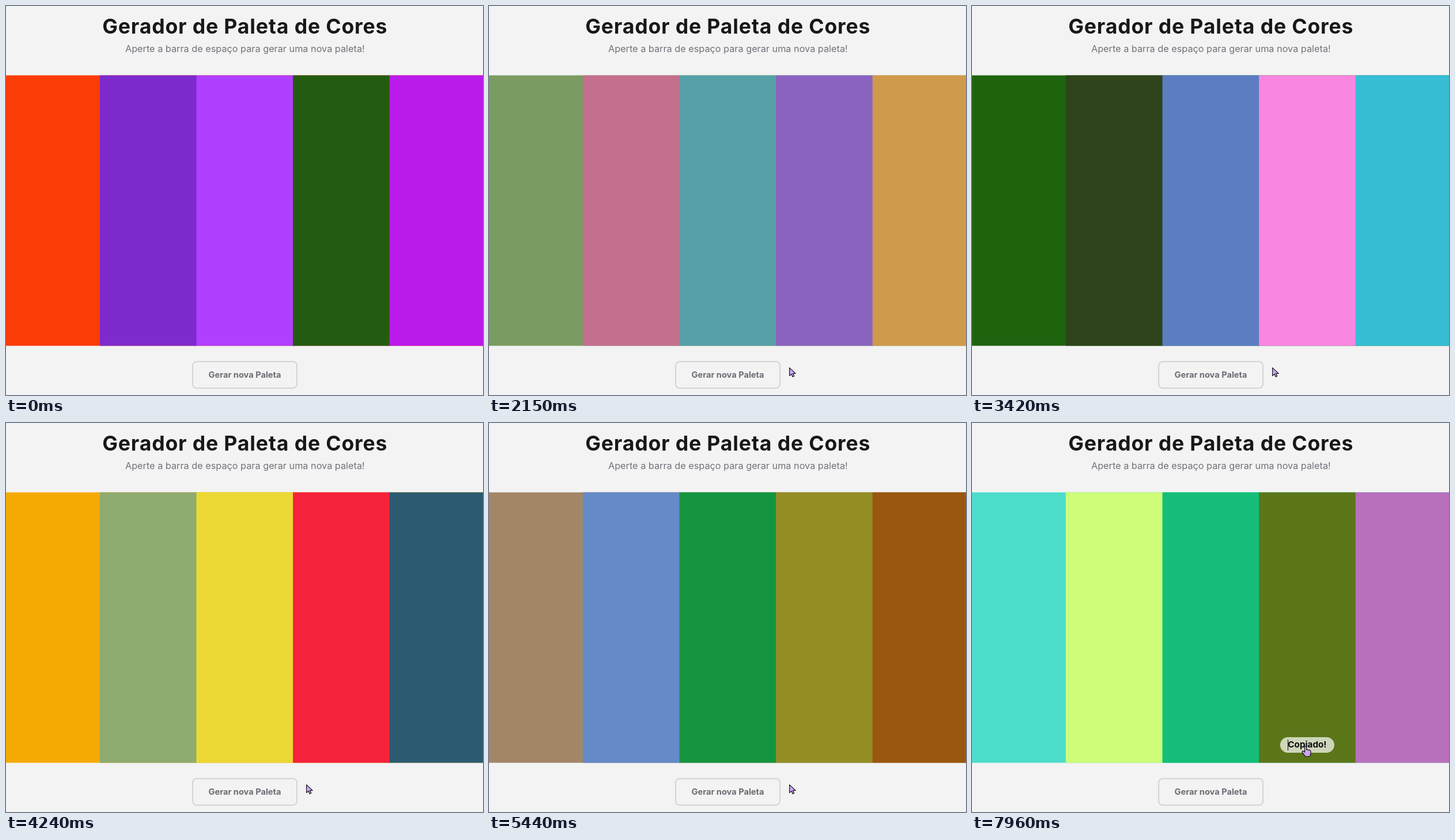
An HTML page with a canvas that plays this animation: 828 px wide and 676 px high, repeating every 8000 ms.

```html
<!DOCTYPE html>
<html lang="pt-BR">
<head>
<meta charset="utf-8">
<title>Gerador de Paleta de Cores</title>
<style>
  html, body { margin: 0; width: 100%; height: 100%; overflow: hidden; background: #f3f3f3; }
  canvas { display: block; width: 828px; height: 676px; }
</style>
</head>
<body>
<canvas id="stage" width="828" height="676"></canvas>
<script>
const ctx = document.getElementById('stage').getContext('2d');
const LOOP = 8000;
const STEP = 1000 / 15; // pointer sampling interval
const EDGES = [0, 162.8, 330.5, 498.1, 665.7, 828];
const TOP = 120.5, BOTTOM = 590.5;
const FAMILY = 'Inter, "Open Sans", sans-serif';

// Start time followed by the five colours shown from then on
const PALETTES = [
  [0, '#fb3c07', '#7d2bcd', '#b13fff', '#235c10', '#ba1beb'],
  [1490, '#93cbff', '#af74b7', '#757e0b', '#a1f04d', '#5fbf80'],
  [2150, '#7a9c62', '#c46f8e', '#58a0a8', '#8a63c0', '#d09a4c'],
  [2620, '#fcf4a4', '#e1fa92', '#e39254', '#43d098', '#ba1b9b'],
  [3020, '#8c7a4e', '#5f9f87', '#a66bb4', '#c9a65a', '#5d78a8'],
  [3420, '#1e640f', '#2f441a', '#5c7dc2', '#f986e0', '#37bdd6'],
  [3840, '#94785f', '#6b8f9c', '#b08a52', '#9a6fa6', '#5e9a74'],
  [4240, '#f5aa04', '#8fab70', '#ecd834', '#f5223b', '#2b5a71'],
  [4710, '#a5706a', '#7a86b0', '#68a07c', '#b9944f', '#805f92'],
  [5040, '#7e9a54', '#a8739a', '#5c8fa4', '#b5805c', '#6f72a9'],
  [5440, '#a38668', '#648ac7', '#15943f', '#948c24', '#9a5710'],
  [5840, '#4cddcb', '#cdfd79', '#15be78', '#5b7619', '#b870bc']
];

// Times at which the button caret switches, starting hidden
const BLINKS = [410, 940, 1490, 2020, 2550, 3090, 3620, 4110, 4710, 5170, 5710, 6240];

// Pointer path: time, x, y
const PATH = [
  [70, 633, 646], [140, 597, 641], [210, 558, 634], [280, 524, 621], [340, 505, 620],
  [410, 508, 624], [490, 521, 628], [6450, 521, 628], [6580, 560, 617],
  [6720, 640, 590], [6860, 718, 568], [6990, 742, 559], [7330, 742, 559],
  [7470, 698, 563], [7600, 610, 563], [7740, 579, 561], [8000, 579, 561]
];

// Clicks on a colour label: time and column
const CLICKS = [[7190, 4], [7860, 3]];

function paletteAt(t) {
  return PALETTES.filter(p => p[0] <= t).pop().slice(1);
}

function pointerAt(t) {
  if (t < PATH[0][0]) return null;
  const i = PATH.findIndex(p => p[0] > t);
  const [t0, x0, y0] = PATH[i - 1];
  const [t1, x1, y1] = PATH[i];
  const k = (t - t0) / (t1 - t0);
  return { x: x0 + (x1 - x0) * k, y: y0 + (y1 - y0) * k };
}

function text(str, x, y, weight, size, color, spacing = 0) {
  ctx.font = `${weight} ${size}px ${FAMILY}`;
  ctx.letterSpacing = `${spacing}px`;
  ctx.fillStyle = color;
  ctx.textAlign = 'center';
  ctx.fillText(str, x, y);
  return ctx.measureText(str).width;
}

function roundRect(x, y, w, h, r) {
  ctx.beginPath();
  ctx.roundRect(x, y, w, h, r);
}

function caret(x, y, color) {
  ctx.fillStyle = color;
  ctx.fillRect(x, y, 1, 19);
}

function drawLabel(col, color, copied) {
  const mid = (EDGES[col] + EDGES[col + 1]) / 2;
  const half = copied ? 47 : 49;
  roundRect(mid - half, 546, half * 2, 27, 13.5);
  ctx.fillStyle = 'rgba(255,255,255,0.7)';
  ctx.fill();
  const w = text(copied ? 'Copiado!' : color.toUpperCase(), mid, 564.3, 700, 15.2, '#0c0c0e');
  if (copied) caret(Math.round(mid - w / 2), 550, '#000');
}

function drawShape(path, x, y) {
  ctx.save();
  ctx.translate(x, y);
  ctx.fillStyle = '#cda6f5';
  ctx.strokeStyle = '#17131c';
  ctx.lineWidth = 1.2;
  ctx.lineJoin = 'round';
  ctx.fill(path);
  ctx.stroke(path);
  ctx.restore();
}

const ARROW = new Path2D('M.6 .6V14.6L4 11.6L6.2 16.4L8.7 15.3L6.5 10.6H11.2Z');
const HAND = new Path2D('M-1.5 1.5Q0-.5 1.5 1.5V7Q3 5.8 4.4 7.4Q6 6.5 7 8Q8.8 7.6 9 9.5V13Q8.6 16 6.8 18.5H-.5Q-2.5 15.5-5.5 12Q-7 9.6-4.7 9.2Q-3 9.4-1.5 11Z');

function draw(t) {
  const colors = paletteAt(t);
  const pointer = pointerAt(Math.floor(t / STEP + 0.05) * STEP + 3);

  ctx.fillStyle = '#f3f3f3';
  ctx.fillRect(0, 0, 828, 676);
  text('Gerador de Paleta de Cores', 414.8, 48, 700, 35.6, '#18181b', 0.85);
  text('Aperte a barra de espaço para gerar uma nova paleta!', 414.8, 80, 400, 16.25, '#71717a');

  // Each column is cut from one clipped band, so soft edges blend into the neighbour
  ctx.fillStyle = colors[0];
  ctx.fillRect(0, TOP, 828, BOTTOM - TOP);
  colors.slice(1).forEach((c, i) => {
    ctx.fillStyle = c;
    ctx.fillRect(EDGES[i + 1], TOP, EDGES[i + 2] - EDGES[i + 1] + 1, BOTTOM - TOP);
  });

  roundRect(324, 618, 181, 46, 7);
  ctx.strokeStyle = '#d4d4d6';
  ctx.lineWidth = 2;
  ctx.stroke();
  text('Gerar nova Paleta', 414.5, 646, 700, 14.6, '#6c6c75');
  if (BLINKS.filter(b => b <= t).length % 2) caret(478, 632, '#6c6c75');

  if (!pointer) return;
  if (pointer.y < BOTTOM) {
    const col = EDGES.findIndex(e => e > pointer.x) - 1;
    drawLabel(col, colors[col], CLICKS.some(([at, c]) => c === col && t >= at));
    const mid = (EDGES[col] + EDGES[col + 1]) / 2;
    const onLabel = Math.abs(pointer.x - mid) < 49 && pointer.y < 573;
    drawShape(onLabel ? HAND : ARROW, pointer.x, pointer.y);
  } else {
    drawShape(ARROW, pointer.x, pointer.y);
  }
}

function frame() {
  draw(performance.now() % LOOP);
  requestAnimationFrame(frame);
}
frame();
</script>
</body>
</html>
```
